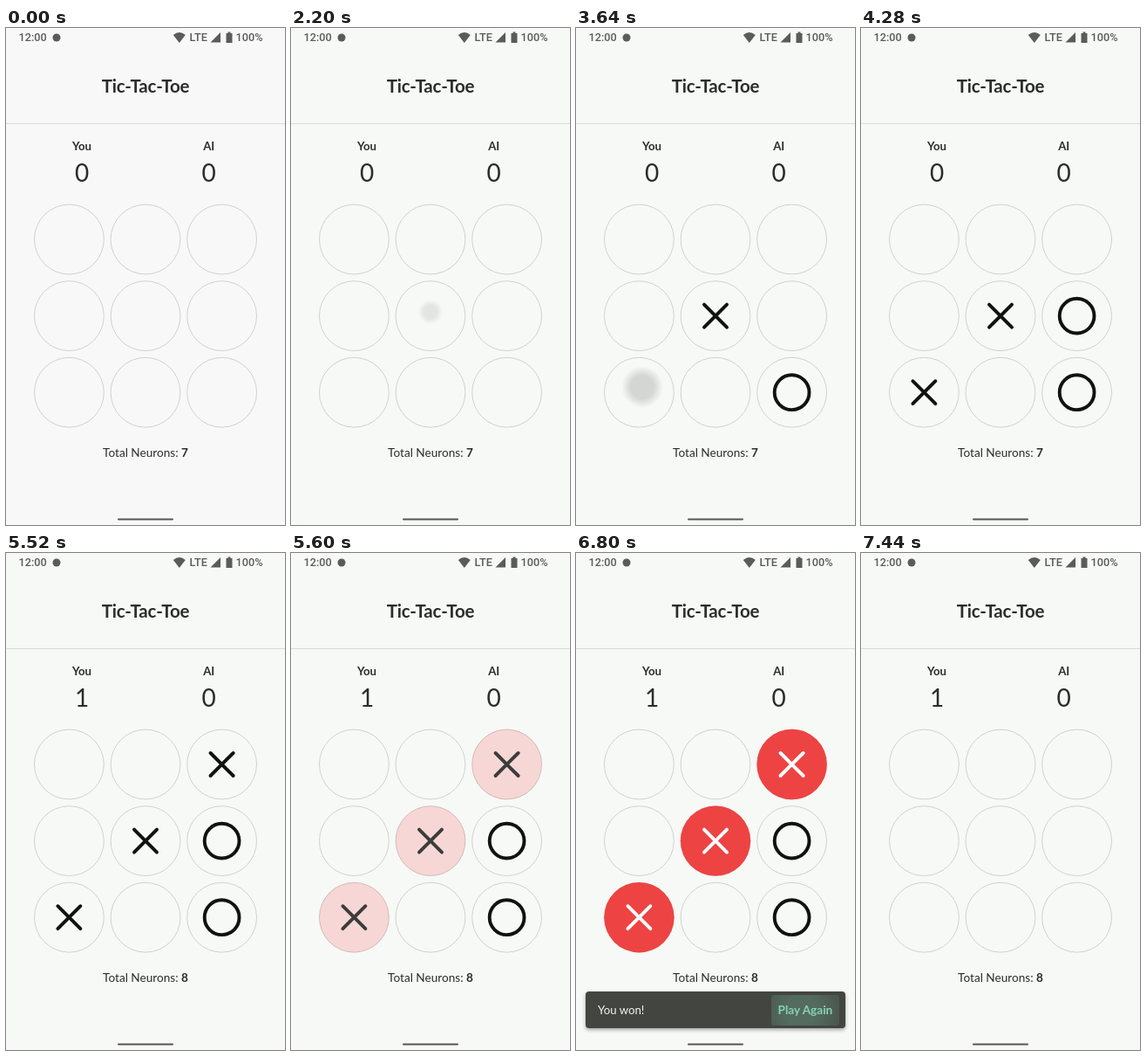
Recreate the animation shown at these times as an HTML page. Size 320 by 569 pixels, loop 7800 ms.

```html
<!DOCTYPE html>
<html lang="en">
<head>
<meta charset="utf-8">
<title>Tic-Tac-Toe</title>
<style>
  html, body { margin: 0; width: 100%; height: 100%; overflow: hidden; background: #f7f9f6; }
  svg { display: block; width: 100%; height: 100%; }
  text { font-family: Lato, "Open Sans", sans-serif; fill: #2b2c2b; }
  .mid { text-anchor: middle; }
  .bold { font-weight: 700; }
  .status text { font: 500 12.7px Roboto, sans-serif; fill: #5a5b5a; }
  .status path, .status circle, .status rect { fill: #5a5b5a; }
  .mark { fill: none; stroke: #111; stroke-width: 3.9; stroke-linecap: round; }
  .ring { fill: none; stroke: #d0d2cf; stroke-width: 1; }
</style>
</head>
<body>
<svg viewBox="0 0 320 569" preserveAspectRatio="none">
  <defs>
    <radialGradient id="soft">
      <stop offset=".55" stop-color="#000"/>
      <stop offset="1" stop-color="#000" stop-opacity="0"/>
    </radialGradient>
    <radialGradient id="mint">
      <stop offset=".4" stop-color="#86d3b8"/>
      <stop offset="1" stop-color="#86d3b8" stop-opacity="0"/>
    </radialGradient>
    <clipPath id="button"><rect x="224" y="506" width="78" height="35" rx="3"/></clipPath>
    <filter id="shadow" x="-10%" y="-30%" width="120%" height="170%">
      <feDropShadow dx="0" dy="2" stdDeviation="2" flood-opacity=".35"/>
    </filter>
  </defs>

  <rect id="page" width="320" height="569"/>

  <g class="status">
    <text x="14.5" y="15.2">12:00</text>
    <circle cx="58" cy="11" r="4.5"/>
    <path d="M191.8 8 Q198.8 2.2 205.8 8 L198.8 17Z"/>
    <text x="210.5" y="15.2">LTE</text>
    <path d="M246 5V16.5H234.5Z"/>
    <path d="M254.5 4.5h3v1.5h2v11h-7V6h2z"/>
    <text x="263.5" y="15.2">100%</text>
  </g>

  <text class="mid bold" x="160" y="74" font-size="20.5" letter-spacing="-.2">Tic-Tac-Toe</text>
  <path d="M0 109.5H320" stroke="#d9dbd8"/>
  <text class="mid bold" x="87" y="140" font-size="13.2">You</text>
  <text class="mid bold" x="232.7" y="140" font-size="13.2">AI</text>
  <text class="mid" id="score" x="87" y="176" font-size="28">0</text>
  <text class="mid" x="232.7" y="176" font-size="28">0</text>

  <g id="board"></g>
  <circle id="touch" fill="url(#soft)"/>

  <text class="mid" x="160" y="491" font-size="13.6">Total Neurons: <tspan class="bold" id="neurons">7</tspan></text>

  <g id="bar">
    <rect x="11" y="502" width="298" height="42" rx="4" fill="#424440" filter="url(#shadow)"/>
    <g id="barContent">
      <g clip-path="url(#button)">
        <rect id="press" x="224" y="506" width="78" height="35" fill="#86d3b8"/>
        <circle id="pressRipple" cx="258" cy="524" fill="url(#mint)"/>
      </g>
      <text x="25" y="528" font-size="13.2" style="fill:#f4f5f3">You won!</text>
      <text class="bold" x="231.5" y="528" font-size="13.6" style="fill:#86d3b8">Play Again</text>
    </g>
  </g>

  <rect x="128" y="561.5" width="64" height="2" rx="1" fill="#555655"/>
</svg>
<script>
const LOOP = 7800, STEP = 40, CLEAR = 7440, SCORED = 5520;
const $ = id => document.getElementById(id);

// col, row, kind, start, duration
const MOVES = [
  [1, 1, 'X', 2370, 150],
  [2, 2, 'O', 2610, 190],
  [0, 2, 'X', 3810, 150],
  [2, 1, 'O', 4090, 190],
  [2, 0, 'X', 5230, 130]
];
// start, x, y, radius, opacity
const TOUCHES = [
  [2200, 160, 325, 14, .08],
  [3640, 76, 411, 24, .14],
  [5120, 249.5, 240, 38, .11]
];

const cellX = col => 72.4 + 87.6 * col;
const cellY = row => 242 + 87.6 * row;
const linear = (t, from, to) => Math.min(1, Math.max(0, (t - from) / (to - from)));
const ease = (t, from, to) => {
  const p = linear(t, from, to);
  return p * p * (3 - 2 * p);
};

function add(tag, attrs) {
  const el = document.createElementNS('http://www.w3.org/2000/svg', tag);
  for (const name in attrs) el.setAttribute(name, attrs[name]);
  return $('board').appendChild(el);
}

for (let i = 0; i < 9; i++)
  add('circle', { class: 'ring', cx: cellX(i % 3), cy: cellY(Math.floor(i / 3)), r: 39.9 });

const marks = MOVES.map(([col, row, kind, start, duration]) => {
  const cx = cellX(col), cy = cellY(row);
  if (kind === 'O')
    return { start, duration, el: add('circle', { class: 'mark', cx, cy, r: 19.9 }) };
  const fill = add('circle', { cx, cy, r: 40.2, fill: '#ee4343' });
  const d = `M${cx - 13} ${cy - 13}l26 26m0 -26l-26 26`;
  return { start, duration, fill, el: add('path', { class: 'mark', d }) };
});

function draw(t) {
  $('page').setAttribute('fill', t < 2200 ? '#f8f8f8' : '#f7f9f6');
  $('score').textContent = t < SCORED ? 0 : 1;
  $('neurons').textContent = t < SCORED ? 7 : 8;

  const win = ease(t, 5540, 5760) - ease(t, 7080, 7320);
  const shade = Math.round(17 + 238 * win);
  for (const { el, fill, start, duration } of marks) {
    el.style.opacity = t < CLEAR ? ease(t, start, start + duration) : 0;
    if (!fill) continue;
    fill.style.opacity = win;
    el.style.stroke = `rgb(${shade},${shade},${shade})`;
  }

  const touch = TOUCHES.find(([start]) => t >= start && t < start + STEP);
  $('touch').style.opacity = touch ? touch[4] : 0;
  if (touch) ['cx', 'cy', 'r'].forEach((name, i) => $('touch').setAttribute(name, touch[i + 1]));

  $('bar').style.opacity = ease(t, 5662, 5800) - ease(t, 6880, 7080);
  $('barContent').style.opacity = ease(t, 5730, 5800);
  $('press').style.opacity = .12 * linear(t, 6600, 6760);
  $('pressRipple').style.opacity = .16 * linear(t, 6600, 6680);
  $('pressRipple').setAttribute('r', 8 + 37 * linear(t, 6640, 6800));
}

const begin = performance.now();
function tick() {
  const t = (performance.now() - begin) % LOOP;
  draw(Math.floor(t / STEP) * STEP);
  requestAnimationFrame(tick);
}
tick();
</script>
</body>
</html>
```
